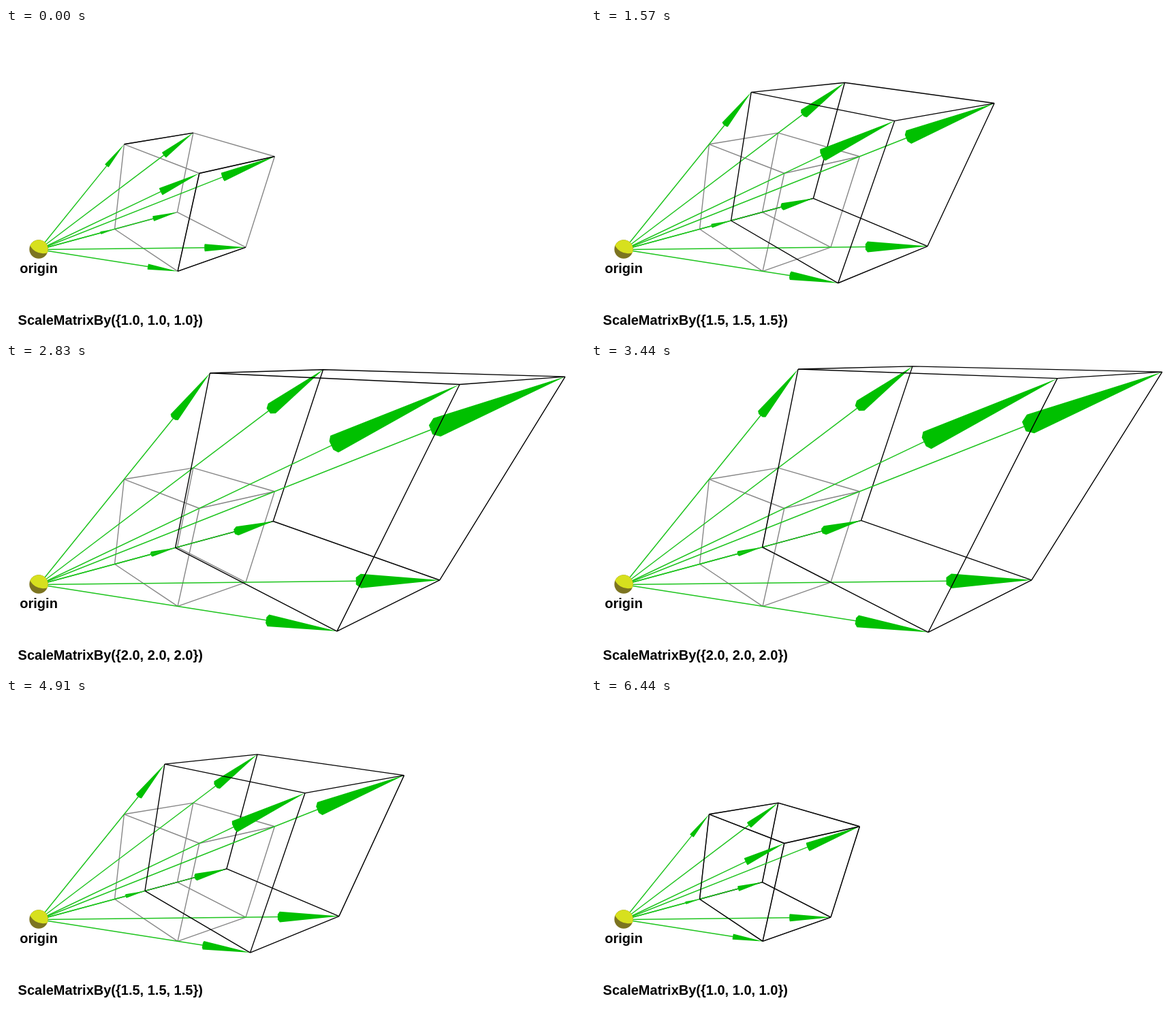
These frames come from a looping animation (850x451 px, 6.51 s). An HTML page with a canvas:

```html
<!DOCTYPE html>
<html lang="en">
<head>
<meta charset="utf-8">
<title>Scaling a box from the origin</title>
<style>
html, body { margin: 0; width: 100%; height: 100%; overflow: hidden; background: #fff; }
canvas { display: block; }
</style>
</head>
<body>
<canvas id="stage" width="850" height="451"></canvas>
<script>
const ctx = document.getElementById('stage').getContext('2d');
const LOOP = 6510, STEP = 68.5, LAST = 94;
const ORIGIN = { x: 48, y: 325 };

// The box in projective space, relative to the origin: x, y and depth.
const NEAREST = [122, -33, 0.0988];
const SIDES = [[120.4, -32.6, 0.0955], [64.2, 62.2, -0.184], [-0.3, -117.7, -0.1247]];
const BACK = 1, FRONT = 2;

// The bits of a corner's index tell which sides lead to it.
const corners = Array.from({ length: 8 }, (_, i) => {
  const bits = [i & 1, i >> 1 & 1, i >> 2];
  const [x, y, depth] = NEAREST.map((v, axis) =>
    SIDES.reduce((sum, side, j) => sum + bits[j] * side[axis], v));
  return {
    x, y, depth,
    radius: Math.sqrt(5 + 15 * bits[0] + 10 * bits[1] + 7 * bits[2]),
    round: 0.42 + 0.36 * bits[0]
  };
});

const edges = [];
for (let a = 0; a < 8; a++)
  for (const bit of [1, 2, 4]) if (!(a & bit)) edges.push([a, a | bit]);

const isBack = edge => edge.includes(BACK);
const backEdges = edges.filter(isBack);
const frontEdges = edges.filter(e => !isBack(e));
const restEdges = frontEdges.filter(([a, b]) => b - a === 1 || (a === FRONT && b - a === 4));

function project(c, s) {
  const w = 1 + c.depth * s;
  return { x: ORIGIN.x + c.x * s / w, y: ORIGIN.y + c.y * s / w };
}

function drawEdges(list, s, color) {
  ctx.strokeStyle = color;
  ctx.lineWidth = 1.4;
  ctx.beginPath();
  for (const [a, b] of list) {
    const p = project(corners[a], s), q = project(corners[b], s);
    ctx.moveTo(p.x, p.y);
    ctx.lineTo(q.x, q.y);
  }
  ctx.stroke();
}

function drawArrow(c, s) {
  const tip = project(c, s), base = project(c, 0.8 * s);
  ctx.strokeStyle = '#1ec41e';
  ctx.lineWidth = 1.5;
  ctx.beginPath();
  ctx.moveTo(ORIGIN.x, ORIGIN.y);
  ctx.lineTo(base.x, base.y);
  ctx.stroke();

  const len = Math.hypot(c.x, c.y), ux = c.x / len, uy = c.y / len;
  const radius = c.radius * s / (1 + 0.8 * c.depth * s);
  const bulge = radius * c.round * (0.15 + 0.9 * (s - 1));
  ctx.fillStyle = '#00c000';
  ctx.beginPath();
  ctx.moveTo(tip.x, tip.y);
  for (let i = 0; i <= 3; i++) {
    const w = radius * Math.cos(i * Math.PI / 3), d = bulge * Math.sin(i * Math.PI / 3);
    ctx.lineTo(base.x - uy * w - ux * d, base.y + ux * w - uy * d);
  }
  ctx.fill();
}

function drawSphere() {
  const x = ORIGIN.x - 0.5, y = ORIGIN.y - 0.5, r = 13.7;
  ctx.fillStyle = '#7c7420';
  ctx.beginPath();
  ctx.arc(x, y, r, 0, 2 * Math.PI);
  ctx.fill();
  ctx.fillStyle = '#d7e01e';
  ctx.beginPath();
  ctx.arc(x, y, r, Math.PI * 1.12, Math.PI * 2.13);
  ctx.quadraticCurveTo(x - 4, y + 9, x - 12.7, y - 5);
  ctx.fill();
}

function draw(t) {
  const step = Math.min(LAST, Math.floor(t / STEP + 0.35));
  const angle = step / LAST * 2 * Math.PI - 0.016;
  const s = 1.5 - 0.5 * Math.cos(angle);
  ctx.fillStyle = '#fff';
  ctx.fillRect(0, 0, 850, 451);

  ctx.save();
  ctx.translate(0.5, 0.5);
  drawEdges(edges, 1, '#858585');
  if (step) drawEdges(backEdges, s, '#000');
  corners.forEach(c => drawArrow(c, s));
  drawEdges(step ? frontEdges : restEdges, s, '#000');
  drawSphere();
  ctx.restore();

  const n = s.toFixed(1);
  ctx.fillStyle = '#000';
  ctx.font = 'bold 20px "Liberation Sans", Arial, sans-serif';
  ctx.fillText('origin', 20.3, 360);
  ctx.fillText(`ScaleMatrixBy({${n}, ${n}, ${n}})`, 17.6, 436);
}

const begin = performance.now();
function tick() {
  draw((performance.now() - begin) % LOOP);
  requestAnimationFrame(tick);
}
tick();
</script>
</body>
</html>
```
